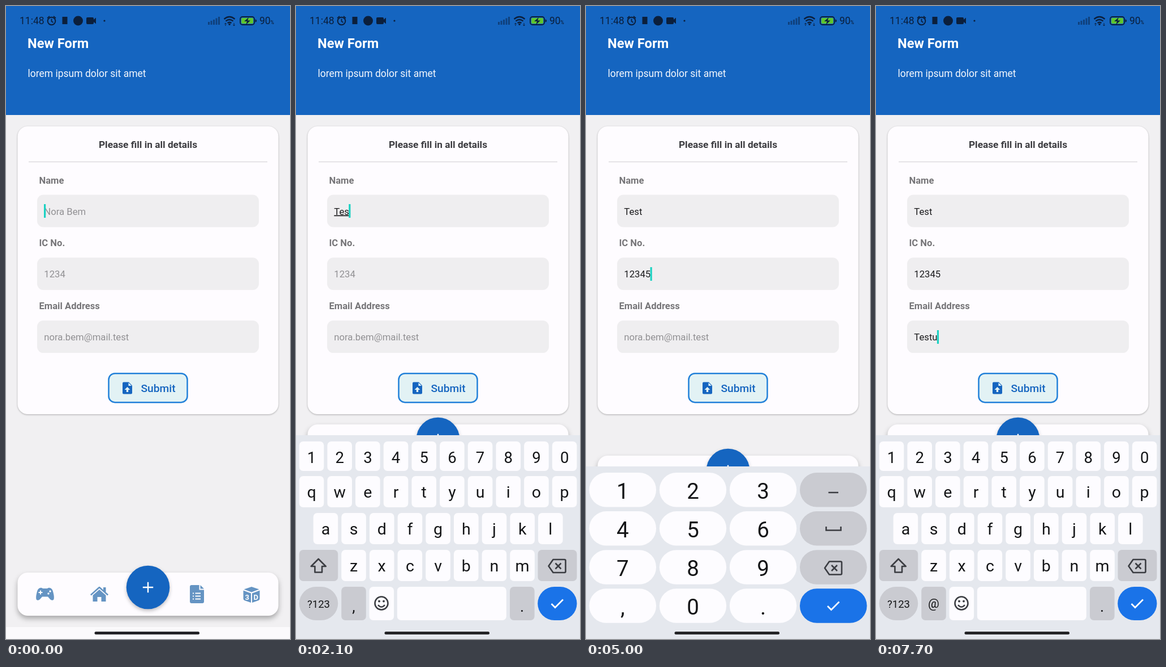
Animation of 502x1115 px, one loop 8 s. Source, as an HTML page:

```html
<!DOCTYPE html>
<html lang="en">
<head>
<meta charset="utf-8">
<title>New Form</title>
<style>
  html, body { margin: 0; width: 100%; height: 100%; overflow: hidden; background: #f1f0f2; }
  svg { display: block; width: 502px; height: 1115px; font-family: Roboto, sans-serif; }
  .mid { text-anchor: middle; }
  .label { font-weight: 700; font-size: 16.6px; fill: #767578; }
  .value { font-size: 16.7px; fill: #1b1b1d; }
  .value.hint { fill: #919093; }
  .value.draft { text-decoration: underline; }
  .card { fill: #fefcff; filter: drop-shadow(0 1px 1.5px rgba(0,0,0,.28)); }
  .bar { fill: #fefcff; filter: drop-shadow(0 5px 5px rgba(0,0,0,.3)); }
  .fab { fill: #1565c0; filter: drop-shadow(0 3px 3px rgba(0,0,0,.25)); }
  .key { fill: #fdfcff; }
  .alt { fill: #cacbd1; }
  .go { fill: #1a73e8; }
  .down { fill: #cdd0d7; }
  .line { fill: none; stroke: #3b3d42; stroke-width: 2.6; stroke-linejoin: round; }
  .glyph { text-anchor: middle; fill: #141517; }
  .status { fill: #0b1f3c; }
</style>
</head>
<body>
<svg viewBox="0 0 502 1115">
  <rect width="502" height="1115" fill="#f1f0f2"/>
  <rect width="502" height="192" fill="#1565c0"/>
  <g class="status" font-size="17.5">
    <text x="24" y="32">11:48</text>
    <g fill="none" stroke="#0b1f3c" stroke-width="2">
      <circle cx="80.5" cy="26.5" r="6.8"/>
      <path d="M80.5 22.5v4.500l3 2M73 21.500l4-3.500M88 21.500l-4-3.500" stroke-width="1.700"/>
    </g>
    <rect x="99.500" y="19" width="9" height="13"/>
    <circle cx="127.500" cy="26" r="8.500"/>
    <path d="M144 20h9q2 0 2 2v2l4-3.500v11l-4-3.500v2q0 2-2 2h-9q-2 0-2-2v-8q0-2 2-2z"/>
    <circle cx="174" cy="26" r="1.600"/>
    <g opacity=".5">
      <rect x="357" y="28" width="3" height="5"/><rect x="361.500" y="26" width="3" height="7"/>
      <rect x="366" y="24" width="3" height="9"/><rect x="370.500" y="21.500" width="3" height="11.500"/>
      <rect x="375" y="19" width="3" height="14"/>
    </g>
    <g fill="none" stroke="#0b1f3c" stroke-width="2.300">
      <path d="M385.500 23q9.500-8 19 0M388.500 26.700q6.500-5.400 13 0M391.600 30q3.400-2.600 6.800 0"/>
    </g>
    <circle cx="395" cy="32.300" r="1.700"/>
    <path d="M388 30v5M386.300 31.700l1.700-1.700 1.700 1.700M403 30v5M401.300 33.300l1.700 1.700 1.700-1.700" fill="none" stroke="#0b1f3c"/>
    <rect x="414" y="19" width="25" height="14" rx="4" fill="none" stroke="#0b1f3c" stroke-width="1.800"/>
    <rect x="416" y="21" width="21" height="10" rx="2" fill="#5fc52e"/>
    <path d="M440.500 23.500q2.500 0 2.500 2.500t-2.500 2.500z"/>
    <path d="M429 20l-8 7h5l-2 6 8-7.500h-5z"/>
    <text x="448" y="32">90</text>
    <text x="467.500" y="32" font-size="8.500" font-weight="500">%</text>
  </g>
  <text x="38" y="74" font-size="23.700" font-weight="700" fill="#fff">New Form</text>
  <text x="38.500" y="125" font-size="17.500" fill="#f4f7fc">lorem ipsum dolor sit amet</text>

  <rect class="card" x="20.500" y="212" width="461" height="507" rx="18"/>
  <text class="mid" x="251" y="250" font-size="17.250" font-weight="700" fill="#3c3c40">Please fill in all details</text>
  <path d="M40 274.500H462" stroke="#dcdbde" stroke-width="1.300"/>
  <g id="form"></g>
  <rect id="caret" width="3.200" height="24" fill="#1bd2c3"/>
  <rect x="181.500" y="647.200" width="139" height="51" rx="11" fill="#e2f2f4" stroke="#2281d9" stroke-width="2.500"/>
  <path d="M208 662.500h9l6 6v13q0 2-2 2h-13q-2 0-2-2v-17q0-2 2-2z" fill="#1565c0"/>
  <path d="M216.500 663.500v5.500h5.500zM214.500 671l5 5h-3.300v4h-3.400v-4h-3.300z" fill="#e2f2f4"/>
  <text x="238.500" y="680" font-size="19.200" font-weight="500" fill="#1565c0">Submit</text>

  <rect y="1094" width="502" height="21" fill="#fbfafc"/>
  <g id="nav">
    <rect class="bar" x="20.500" y="998" width="461" height="76" rx="18"/>
    <g fill="#6594c3">
      <path d="M60 1025q3-1 5 1h8q2-2 5-1 4 1 5.500 8 2.500 10 .5 13-3 2-6-1l-4-4.500h-10l-4 4.500q-3 3-6 1-2-3 .500-13 1.500-7 5.500-8z"/>
      <path d="M149 1036.500l14.500-13q1.500-1.300 3 0l5.500 5v-4.500h4.500v8.500l4.500 4-1.700 2-14.300-12.700-14.300 12.700z"/>
      <path d="M153.500 1038l11.500-10 11.500 10v11h-8v-8h-7v8h-8z"/>
      <path d="M328 1020h13.500v8.500h8.500v20.500q0 3-3 3h-19q-3 0-3-3v-26q0-3 3-3zM343.500 1020l6.500 6.500h-6.500z"/>
      <path d="M434 1023l13.500 4.500-13.500 5-13.500-5zM419.500 1029.500l13.500 5v16.500l-11.500-4q-2-1-2-3zM448.500 1029.500l-13.500 5v16.500l11.500-4q2-1 2-3z"/>
    </g>
    <path d="M61 1029.500v7M57.500 1033h7M334.500 1034.500h9.500M334.500 1039.500h9.500M334.500 1044.500h9.500" stroke="#fff" stroke-width="2"/>
    <path d="M330 1034.500h2M330 1039.500h2M330 1044.500h2" stroke="#fff" stroke-width="2"/>
    <g fill="#fff">
      <circle cx="75" cy="1035" r="1.700"/><circle cx="78" cy="1031" r="1.700"/>
      <text class="mid" x="426.300" y="1045.500" font-size="13" font-weight="700">3</text>
      <text class="mid" x="441.700" y="1045.500" font-size="13" font-weight="700">D</text>
    </g>
    <circle class="fab" cx="251" cy="1024" r="38.300"/>
    <path d="M251 1014.800v18.400M241.800 1024h18.400" stroke="#fff" stroke-width="2.400"/>
  </g>

  <g id="qwerty"></g>
  <g id="pad"></g>
  <rect x="156.500" y="1102" width="185.500" height="5" rx="2.500" fill="#242427"/>
</svg>
<script>
const LOOP = 8000;
const $ = id => document.getElementById(id);
const hints = ['Nora Bem', '1234', 'nora.bem@mail.test'];

// [time, field, text after the event]
const edits = [
  [0, 0, ''], [1800, 0, 'T'], [2000, 0, 'Te'], [2100, 0, 'Tes'], [2300, 0, 'Test'],
  [3000, 1, ''], [4100, 1, '1'], [4300, 1, '12'], [4400, 1, '123'], [4600, 1, '1234'], [4700, 1, '12345'],
  [5100, 2, ''], [6000, 2, 'T'], [6100, 2, 'Te'], [6300, 2, 'Tes'], [6400, 2, 'Test'], [6700, 2, 'Testu']
];

$('form').innerHTML = ['Name', 'IC No.', 'Email Address'].map((name, i) => {
  const y = 332.5 + i * 110.8;
  return `<text class="label" x="58.500" y="${y - 20}">${name}</text>
    <rect x="55" y="${y}" width="392" height="57" rx="11" fill="#efeef0"/>
    <text class="value" x="67.300" y="${y + 35}"></text>`;
}).join('');
const values = [...document.querySelectorAll('.value')];

const key = (x, y, w, h, r, cls = '', id = '') =>
  `<rect class="key ${cls}" x="${x}" y="${y}" width="${w}" height="${h}" rx="${r}" data-key="${id}"/>`;
const glyph = (x, y, size, s, cls = '') =>
  `<text class="glyph ${cls}" x="${x}" y="${y}" font-size="${size}">${s}</text>`;
const erase = (x, y) =>
  `<path class="line" d="M${x - 15} ${y}l8-11.500h20q2 0 2 2v19q0 2-2 2h-20zM${x - 3} ${y - 5}l10 10m0-10l-10 10"/>`;
const check = (x, y) =>
  `<path d="M${x - 10} ${y}l6.500 6.500L${x + 10.500} ${y - 7.500}" fill="none" stroke="#fff" stroke-width="2.700"/>`;

function buildQwerty() {
  const step = 49.68;
  const row = (s, x0, y, h, base, cls) => [...s].map((c, i) =>
    key(x0 + i * step, y, 43.6, h, 7, '', c) +
    glyph(x0 + i * step + 21.8, base, cls ? 28.5 : 27.5, c, cls)).join('');
  return `<rect y="756" width="502" height="359" fill="#e5e8ee"/>` +
    row('1234567890', 5.7, 767, 52, 805) +
    row('qwertyuiop', 5.7, 828, 55, 866, 'letter') +
    row('asdfghjkl', 30.6, 893, 55, 931, 'letter') +
    row('zxcvbnm', 80.2, 958, 55, 996, 'letter') +
    key(5.7, 958, 68.5, 55, 7, 'alt') +
    '<path id="shift" class="line" d="M39.700 974l13 13h-6.700v10.500h-12.600v-10.500h-6.700z"/>' +
    key(427.5, 958, 69, 55, 7, 'alt') + erase(461.5, 986.5) +
    key(5.7, 1023, 68.5, 59, 29.5, 'alt') + glyph(40, 1060, 18.5, '?123') +
    key(80.2, 1023, 43.6, 59, 7, 'alt') + '<g id="comma"></g>' +
    key(129.5, 1023, 43.6, 59, 7) +
    `<circle class="line" cx="151" cy="1052" r="11.500"/>
     <path class="line" d="M145 1055q6 7 12 0"/>
     <circle cx="147" cy="1048.500" r="1.900" fill="#3b3d42"/><circle cx="155" cy="1048.500" r="1.900" fill="#3b3d42"/>` +
    key(178.8, 1023, 193, 59, 7) +
    key(378, 1023, 43.6, 59, 7, 'alt') + glyph(399.5, 1067, 27, '.') +
    key(427.2, 1023, 69.3, 59, 29.5, 'go') + check(461.5, 1053);
}

function buildPad() {
  let out = '<rect y="811" width="502" height="304" fill="#e5e8ee"/>';
  ['123', '456', '789', ',0.'].forEach((s, r) => {
    const y = 822 + r * 68.1;
    [...s].forEach((c, i) => {
      const x = 5.7 + i * 124.1;
      out += key(x, y, 118.3, 60.5, 30, '', c) + glyph(x + 59.2, y + 46, 38.5, c);
    });
    out += key(378, y, 118.5, 60.5, 30, r < 3 ? 'alt' : 'go');
  });
  return out + '<path class="line" d="M428.500 857h17.500M424.500 917v6.500h26v-6.500" style="stroke-linejoin:miter"/>' +
    erase(437, 990) + check(437, 1057);
}

$('qwerty').innerHTML = buildQwerty();
$('pad').innerHTML = buildPad();
const letters = [...document.querySelectorAll('.letter')];
const keys = [...document.querySelectorAll('[data-key]')].filter(k => k.dataset.key);
const easeOut = p => 1 - (1 - p) ** 3;
const show = (el, on) => el.setAttribute('visibility', on ? 'visible' : 'hidden');

function setText(el, s) {
  if (el.textContent !== s) el.textContent = s;
}

function draw(t) {
  const text = ['', '', ''];
  let at = 0, field = 0;
  for (const [time, f, s] of edits) {
    if (time > t) break;
    [at, field] = [time, f];
    text[f] = s;
  }
  values.forEach((el, i) => {
    setText(el, text[i] || hints[i]);
    el.classList.toggle('hint', !text[i]);
    el.classList.toggle('draft', i === 0 && field === 0 && text[0] !== '');
  });

  const width = text[field] ? values[field].getComputedTextLength() : 0;
  const caret = $('caret');
  caret.setAttribute('x', 67 + width - (width ? .4 : 0));
  caret.setAttribute('y', 349 + field * 111);
  show(caret, (t - at) % 1000 < 500);

  const numeric = t >= 3100 && t < 5200;
  const upper = t < 1800 || (t >= 5200 && t < 6000);
  const rise = easeOut(Math.min(1, Math.max(0, (t - 100) / 400)));
  $('qwerty').setAttribute('transform', `translate(0 ${359 * (1 - rise)})`);
  show($('qwerty'), !numeric && t >= 100);
  show($('pad'), numeric);
  $('nav').setAttribute('transform', `translate(0 ${t < 200 ? 0 : numeric ? -206 : -261})`);

  letters.forEach(el => {
    const c = el.textContent;
    setText(el, upper ? c.toUpperCase() : c.toLowerCase());
  });
  $('shift').style.fill = upper ? '#3b3d42' : 'none';
  const mark = t >= 5200 ? '@' : ',';
  if ($('comma').textContent !== mark)
    $('comma').innerHTML = mark === '@' ? glyph(102, 1060, 22, mark) : glyph(102, 1067, 27, mark);

  // A key stays dark for a moment before its character appears.
  const next = edits.find(e => e[0] > t && e[0] - t <= 100 && e[2]);
  const pressed = next ? next[2].slice(-1).toLowerCase() : '';
  keys.forEach(k => k.classList.toggle('down', k.dataset.key === pressed));
}

const start = performance.now();
function tick() {
  draw((performance.now() - start) % LOOP);
  requestAnimationFrame(tick);
}
tick();
</script>
</body>
</html>
```
